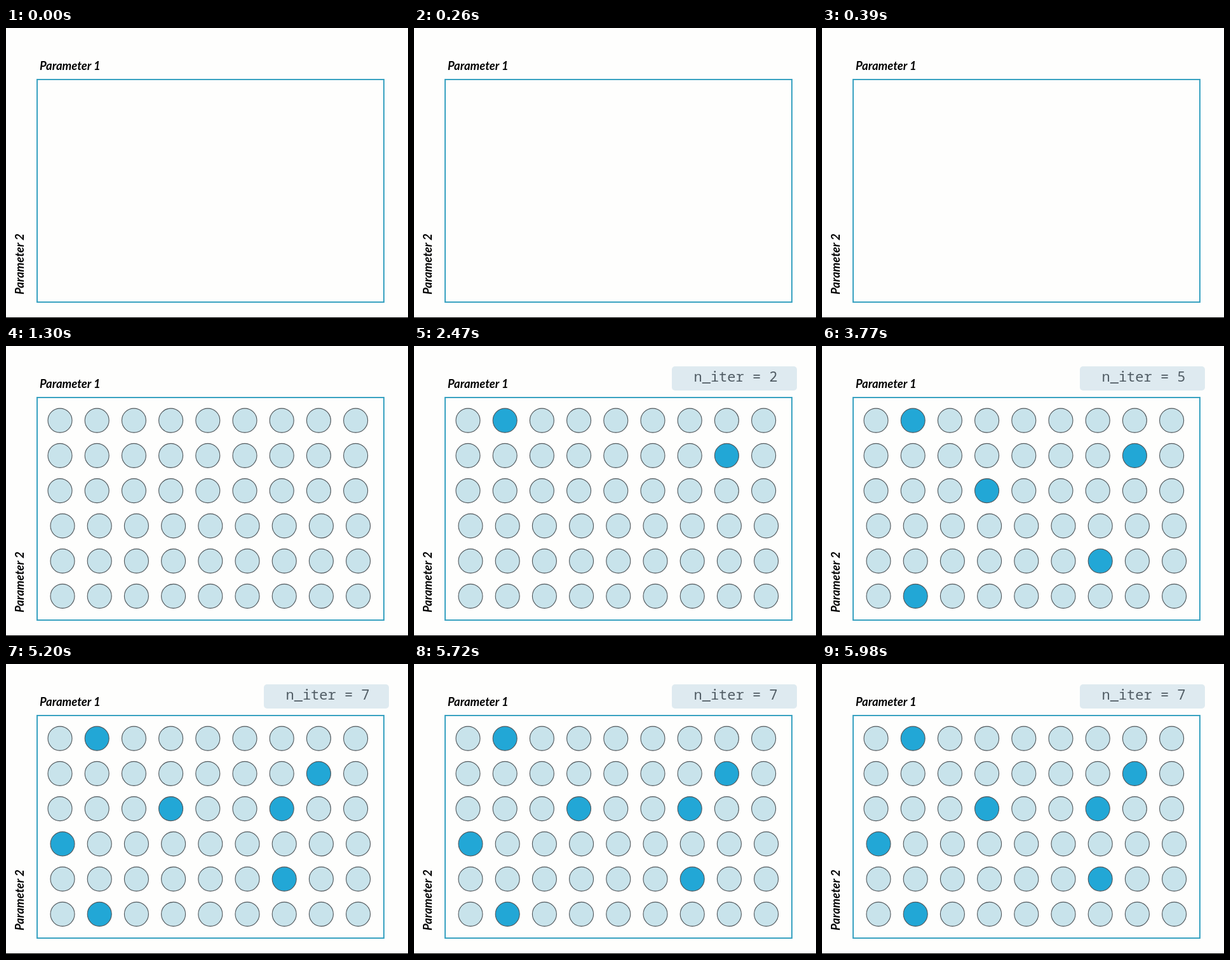
These frames come from a looping animation (633 px wide and 456 px high, 6.37 s). An HTML page:

```html
<!DOCTYPE html>
<html lang="en">
<head>
<meta charset="utf-8">
<title>Random search</title>
<style>
  html, body { margin: 0; width: 100%; height: 100%; overflow: hidden; background: #fefefd; }
  svg { display: block; }
  .label { font: italic bold 18.5px Lato, Carlito, sans-serif; }
  .count { font: 22px "Roboto Mono", "Noto Sans Mono", "DejaVu Sans Mono", monospace; fill: #505c64; }
  circle { fill: #c8e3eb; stroke: #50575b; stroke-width: 1.1; }
  circle.on { fill: #22a7d6; }
</style>
</head>
<body>
<svg width="633" height="456" viewBox="0 0 633 456">
  <rect x="49" y="81" width="546" height="350" fill="none" stroke="#39a2c1" stroke-width="2"/>
  <rect y="455" width="633" height="1"/>
  <text class="label" x="53" y="66">Parameter 1</text>
  <text class="label" transform="translate(28 419) rotate(-90)">Parameter 2</text>
  <g id="dots"></g>
  <g id="badge">
    <rect x="406" y="32" width="197" height="38" rx="5" fill="#deeaf0"/>
    <text id="count" class="count" x="506.5" y="56" text-anchor="middle"></text>
  </g>
</svg>
<script>
const LOOP = 6370, GRID_AT = 1300;
// Samples drawn so far: [start ms, count]
const STEPS = [[2470, 2], [3770, 5], [5200, 7]];
// Order of sampled cells: [row, column]
const PICKS = [[0, 1], [1, 7], [2, 3], [4, 6], [5, 1], [2, 6], [3, 0]];
const COLS = 9, ROWS = 6;
const [dots, badge, count] = ["dots", "badge", "count"].map(id => document.getElementById(id));

for (let row = 0; row < ROWS; row++) {
  for (let col = 0; col < COLS; col++) {
    const dot = document.createElementNS("http://www.w3.org/2000/svg", "circle");
    dot.setAttribute("cx", (row < 3 ? 85 : 89) + col * 58.2);
    dot.setAttribute("cy", 117.1 + row * 55.25);
    dot.setAttribute("r", 19);
    dots.append(dot);
  }
}
const picked = PICKS.map(([row, col]) => dots.children[row * COLS + col]);

function draw(now) {
  const t = now % LOOP;
  const n = STEPS.reduce((last, [start, total]) => t >= start ? total : last, 0);
  dots.style.display = t >= GRID_AT ? "" : "none";
  badge.style.display = n ? "" : "none";
  count.textContent = `n_iter = ${n}`;
  picked.forEach((dot, i) => dot.classList.toggle("on", i < n));
  requestAnimationFrame(draw);
}
draw(0);
</script>
</body>
</html>
```
